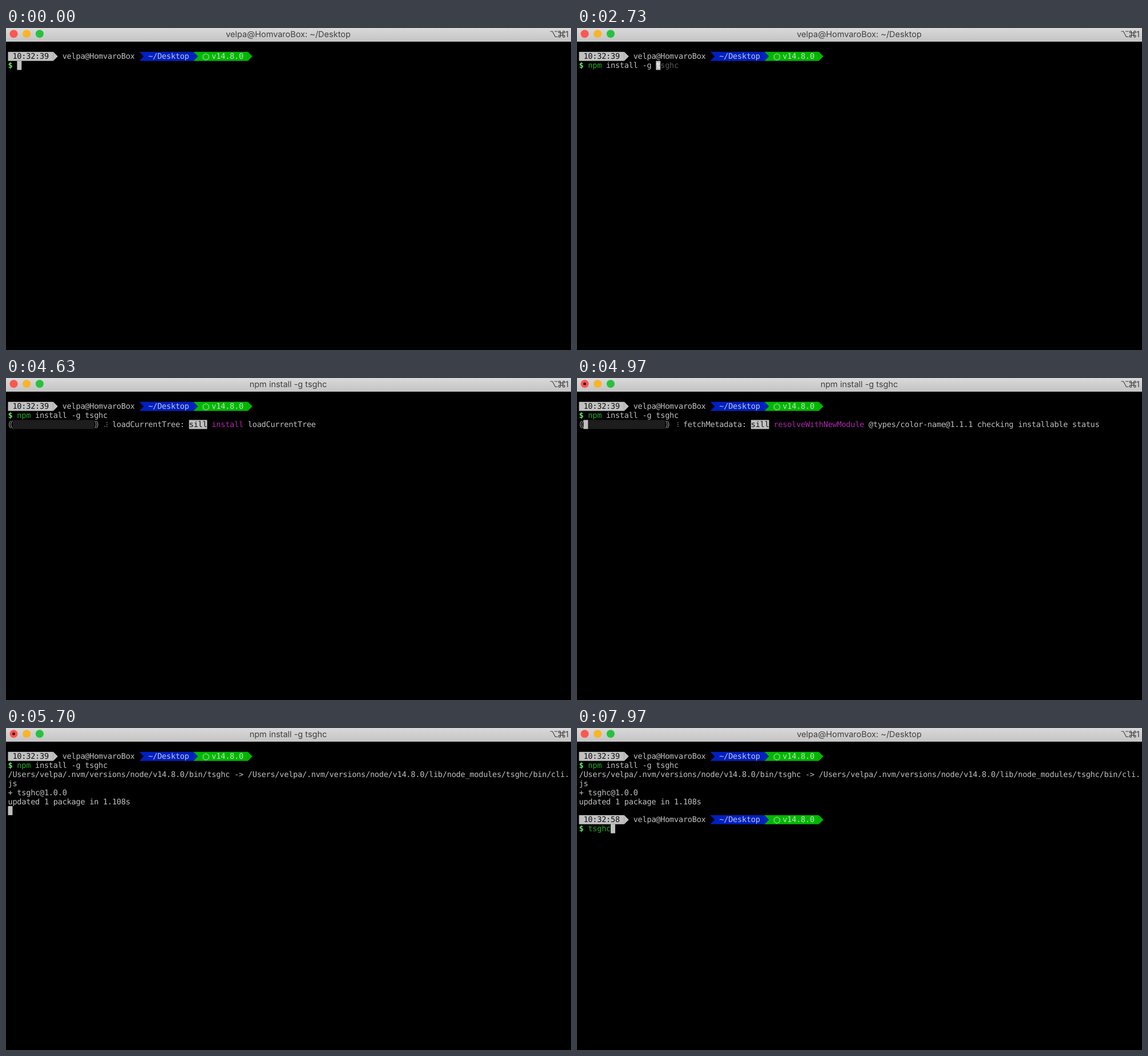
Recreate the animation shown at these times as an HTML page. Size 990x565 px, loop 8000 ms.

```html
<!DOCTYPE html>
<html lang="en">
<head>
<meta charset="utf-8">
<title>Terminal</title>
<style>
html, body { margin: 0; width: 100%; height: 100%; overflow: hidden; background: #000; }
svg { display: block; width: 990px; height: 565px; }
text { white-space: pre; text-rendering: geometricPrecision; }
.mono { font: 13.6px "DejaVu Sans Mono", monospace; }
.bold { font-weight: bold; }
.ui { font: 14.5px Inter, sans-serif; fill: #404040; }
</style>
</head>
<body>
<svg viewBox="0 0 990 565">
  <defs>
    <linearGradient id="bar" x2="0" y2="1">
      <stop stop-color="#d9d9d9"/><stop offset="1" stop-color="#c4c4c4"/>
    </linearGradient>
    <pattern id="shade" width="2.64" height="3.17" patternUnits="userSpaceOnUse">
      <path d="M0 .4h1.1v1h-1.1zM1.3 2h1.1v1h-1.1z" fill="#707070"/>
    </pattern>
  </defs>
  <rect width="990" height="565"/>
  <rect width="990" height="24" fill="url(#bar)"/>
  <circle cx="13.5" cy="10.2" r="7" fill="#fc5650"/>
  <circle cx="36.2" cy="10.2" r="7" fill="#f9b429"/>
  <circle cx="58.9" cy="10.2" r="7" fill="#28c13e"/>
  <circle id="dot" cx="13.5" cy="10.2" r="2.5" fill="#4c0400"/>
  <text id="title" class="ui" x="494.5" y="15.8" text-anchor="middle"></text>
  <g fill="none" stroke="#404040" stroke-width="1.2">
    <path d="M953.5 6h4l5 9.5h4.2M961 6h5.7"/>
    <path d="M971.7 8.7h4v4h-4z"/>
    <circle cx="970" cy="7" r="1.7"/><circle cx="977.4" cy="7" r="1.7"/>
    <circle cx="970" cy="14.4" r="1.7"/><circle cx="977.4" cy="14.4" r="1.7"/>
  </g>
  <text class="ui" x="980" y="15.8">1</text>
  <g id="screen"></g>
</svg>
<script>
const LOOP = 8000, CW = 7.93, RH = 15.87;
const FG = '#c0c0c0', BLUE = '#0020c0', GREEN = '#00b800', CMD = '#20ae20',
      PROMPT = '#62e862', ERR = '#ea625c', HINT = '#585858', MAGENTA = '#b026ad';
const USER = 'velpa', HOST = 'HomvaroBox', COMMAND = 'npm install -g tsghc';
const ENTER = 4280, GAUGE = 4560, OUTPUT = 5680, READY = 5780;
const BUSY_ON = 4720, BUSY_OFF = 6800;

const $ = id => document.getElementById(id);
const colX = c => 3.5 + c * CW;
const rowY = r => 26 + r * RH;

function text(row, col, str, fill = FG, bold = false) {
  const xs = [...str].map((_, i) => colX(col + i).toFixed(2)).join(' ');
  const safe = str.replace(/&/g, '&amp;').replace(/</g, '&lt;');
  return `<text class="mono${bold ? ' bold' : ''}" x="${xs}" y="${rowY(row) + 12.4}" fill="${fill}">${safe}</text>`;
}

function block(row, col, n, fill = FG) {
  return `<rect x="${colX(col)}" y="${rowY(row)}" width="${n * CW}" height="${RH}" fill="${fill}"/>`;
}

function arrow(row, col, fill) {
  const x = colX(col), y = rowY(row);
  return `<path d="M${x - .2} ${y}h.2l${CW} ${RH / 2}l${-CW} ${RH / 2}h-.2z" fill="${fill}"/>`;
}

function promptLine(row, clock) {
  const hex = `<path d="M350.3 ${rowY(row) + 3.2}l5 2.8v5.6l-5 2.8l-5-2.8v-5.6z" fill="none" stroke="#c6dcc6"/>`;
  return block(row, 0, 10) + arrow(row, 10, FG) + text(row, 1, clock, '#101010')
    + text(row, 12, `${USER}@${HOST}`)
    + block(row, 29, 12, BLUE) + arrow(row, 29, '#000') + text(row, 31, '~/Desktop', '#c0c4d8')
    + block(row, 41, 12, GREEN) + arrow(row, 41, BLUE) + hex + text(row, 45, 'v14.8.0', '#c6dcc6')
    + arrow(row, 53, GREEN);
}

// Command line with syntax colouring and a grey completion after the cursor.
function inputLine(row, full, n, cursor) {
  const name = full.split(' ')[0], len = name.length, valid = n >= len;
  let out = text(row, 0, '$', PROMPT, true);
  out += text(row, 2, full.slice(0, Math.min(n, len)), valid ? CMD : ERR, !valid);
  if (n > len) out += text(row, 2 + len, full.slice(len, n));
  if (cursor) {
    out += block(row, 2 + n, 1);
    if (n && n < full.length)
      out += text(row, 2 + n, full[n], '#fafafa') + text(row, 3 + n, full.slice(n + 1), HINT);
  }
  return out;
}

const resolve = (at, fill, pkg) =>
  [at, fill, 'fetchMetadata:', 'resolveWithNewModule', pkg + ' checking installable status'];
const steps = [
  [GAUGE, 0, 'loadCurrentTree:', 'install', 'loadCurrentTree'],
  [4640, 0, 'loadIdealTree:', 'install', 'loadIdealTree'],
  resolve(4720, 1, 'chalk@4.1.0'),
  resolve(4800, 1, 'ansi-styles@4.2.1'),
  resolve(4880, 1, 'color-convert@2.0.1'),
  resolve(4960, 1, '@types/color-name@1.1.1'),
  resolve(5050, 1, 'supports-color@7.1.0'),
  resolve(5140, 2, 'inquirer@7.3.3'),
  resolve(5230, 2, 'external-editor@3.1.0'),
  resolve(5320, 2, 'iconv-lite@0.4.24'),
  resolve(5400, 3, 'tmp@0.0.33'),
  resolve(5450, 3, 'os-tmpdir@1.0.2'),
  [5540, 9, 'extract:', 'extract', 'tsghc@1.0.0'],
  [5620, 16, 'finalize:', 'finalize', 'tsghc@1.0.0']
];

// Lit braille dots per spinner step: 1-3 left column, 4-6 right column.
const spins = ['124', '145', '1456', '456', '3456', '356', '236', '1236', '123', '1234'];

function gauge(t) {
  const [, fill, stage, verb, rest] = steps.filter(s => s[0] <= t).pop();
  const row = 3, y = rowY(row), spin = (Math.floor((t - 4970) / 41) + 23) % 10;
  const paren = (x, bend) => `M${x} ${y + 1.5}q${bend} 6.5 0 13`;
  let out = `<path d="${paren(8, -5)}${paren(11, -5)}${paren(155.5, 5)}${paren(158.5, 5)}" fill="none" stroke="${FG}"/>`;
  out += block(row, 1 + fill, 18 - fill, 'url(#shade)') + block(row, 1, fill);
  for (const d of spins[spin]) {
    const i = d - 1;
    out += `<circle cx="${173.3 + 3.6 * Math.floor(i / 3)}" cy="${y + 4.6 + i % 3 * 3.3}" r=".8" fill="${FG}"/>`;
  }
  let col = 23;
  out += text(row, col, stage);
  col += stage.length + 1;
  out += block(row, col, 4) + text(row, col, 'sill', '#101010');
  out += text(row, col + 5, verb, MAGENTA);
  return out + text(row, col + 6 + verb.length, rest);
}

function result() {
  const root = `/Users/${USER}/.nvm/versions/node/v14.8.0`;
  const link = `${root}/bin/tsghc -> ${root}/lib/node_modules/tsghc/bin/cli.js`;
  return text(3, 0, link.slice(0, 124)) + text(4, 0, link.slice(124))
    + text(5, 0, '+ tsghc@1.0.0') + text(6, 0, 'updated 1 package in 1.108s');
}

const keyTime = k => k < 15 ? 620 + k * 145 : 2900 + (k - 15) * 170;

function typed(t) {
  let n = 0;
  while (n < COMMAND.length && keyTime(n) <= t) n++;
  return n;
}

function screen(t) {
  let out = promptLine(1, '10:32:39') + inputLine(2, COMMAND, typed(t), t < ENTER);
  if (t < ENTER) return out;
  if (t < GAUGE) return out + block(3, 0, 1);
  if (t < OUTPUT) return out + gauge(t);
  out += result();
  if (t < READY) return out + block(7, 0, 1);
  const n = Math.max(0, Math.min(5, Math.floor((t - 6250) / 220) + 1));
  return out + promptLine(8, '10:32:58') + inputLine(9, 'tsghc', n, true);
}

let last = '';
function draw(t) {
  const running = t >= ENTER && t < READY;
  $('title').textContent = running ? COMMAND : `${USER}@${HOST}: ~/Desktop`;
  $('dot').style.display = t >= BUSY_ON && t < BUSY_OFF ? '' : 'none';
  const now = screen(t);
  if (now !== last) $('screen').innerHTML = last = now;
}

const start = performance.now();
function tick() {
  draw((performance.now() - start) % LOOP);
  requestAnimationFrame(tick);
}
tick();
</script>
</body>
</html>
```
